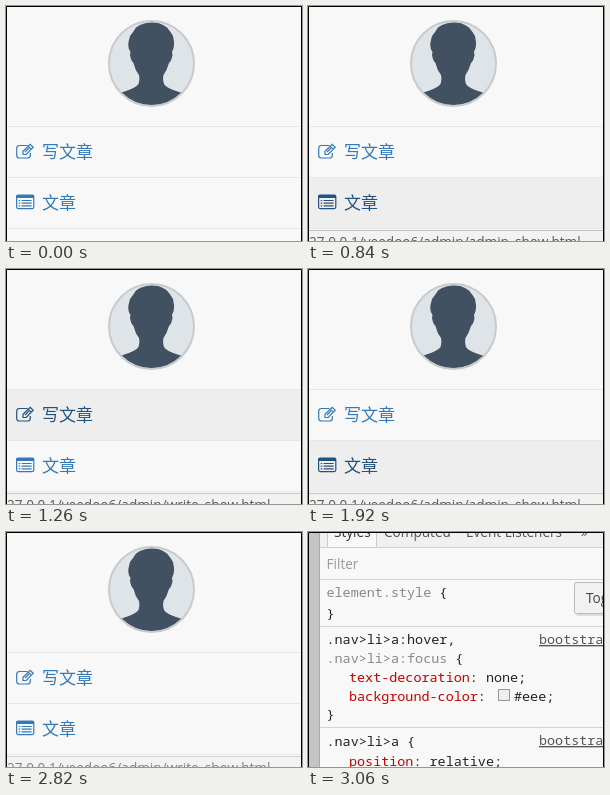
These frames come from a looping animation (296 by 235 pixels, 3.9 s). An HTML page:

```html
<!DOCTYPE html>
<html lang="zh">
<head>
<meta charset="utf-8">
<style>
html, body { margin: 0; width: 100%; height: 100%; overflow: hidden; background: #f8f8f8; }
svg { display: block; width: 100vw; height: 100vh; }
text { white-space: pre; }
.row rect.bg { fill: none; }
.row { color: #337ab7; }
.row.on { color: #23527c; }
.row.on rect.bg { fill: #eee; }
.row text { font: 300 17px "Noto Sans CJK SC", "Noto Sans CJK", sans-serif; fill: currentColor; }
.ui { font: 13.6px "Open Sans", sans-serif; }
.code { font: 13.43px "Noto Sans Mono", monospace; fill: #222; }
.dim { fill: #888; }
.prop { fill: #c80000; }
.link { fill: #555; text-decoration: underline; }
</style>
</head>
<body>
<svg viewBox="0 0 296 235">
  <defs><clipPath id="round"><circle cx="145.5" cy="57.5" r="42"/></clipPath></defs>
  <g id="menu">
    <rect width="296" height="235" fill="#f8f8f8"/>
    <circle cx="145.5" cy="57.5" r="42" fill="#dfe4e8"/>
    <path clip-path="url(#round)" fill="#425161" d="M100 102V92Q107 89 117 86Q130 82 132.500 78Q134 74 133 69
      Q129 64 127.500 57Q125 55 124 49L124.500 46Q121.500 42 122.500 36L124 30L127 26L130 21.500L134 19
      Q140 16 146 16.500Q153 16 157 19L161 21.500L164.500 26L167 30L168 36Q168.500 42 166 46L166.500 49
      Q165.500 55 163 57Q161 64 157.500 69Q156.500 74 158 78Q160 82 173 86Q184 89 191 92V102Z"/>
    <circle cx="145.5" cy="57.5" r="42.500" fill="none" stroke="#c7cbcd" stroke-width="2"/>
    <g class="row">
      <rect class="bg" x="1" y="121" width="294" height="50"/>
      <g fill="none" stroke="currentColor">
        <path stroke-width="1.200" d="M21.500 139.500H13.500Q10.700 139.500 10.700 142.300V149.200Q10.700 152 13.500 152H21.500Q24.300 152 24.300 149.200V147"/>
        <path stroke-width="1.200" d="M17 148.500V145.200L24.200 138.300L27.200 141.200L20.200 148.500ZM22.300 140.200L25.200 143.200M19 146L23 142"/>
      </g>
      <text x="36" y="152">写文章</text>
    </g>
    <g class="row">
      <rect class="bg" x="1" y="172" width="294" height="50"/>
      <g fill="none" stroke="currentColor">
        <rect x="10.600" y="189" width="17.200" height="13.600" rx="1.500" stroke-width="1.200"/>
        <path stroke-width="3" d="M10.500 190.500H28"/>
        <path stroke-width="1.200" d="M12.700 194.500h1.500m1.400 0h10M12.700 197.200h1.500m1.400 0h10M12.700 199.900h1.500m1.400 0h10"/>
      </g>
      <text x="36" y="203">文章</text>
    </g>
    <path stroke="#e7e7e7" d="M1 120.500H295M1 171.500H295M1 222.500H295"/>
    <g id="status">
      <rect x="1" y="224" width="294" height="11" fill="#f2f2f2"/>
      <path stroke="#c4c4c4" d="M1 224.500H295"/>
      <text id="url" class="ui" x="1" y="241" fill="#5a5a5a"></text>
    </g>
  </g>
  <g id="panel">
    <rect width="296" height="235" fill="#f8f8f8"/>
    <path fill="#c4c4c4" d="M1 1H11V235H1Z"/>
    <path fill="#f0f0f0" d="M12 1H295V15H12Z"/>
    <path fill="#f8f8f8" stroke="#ccc" d="M19.500 0V15.500H68.500V0"/>
    <path stroke="#aaa" d="M11.500 1V235"/>
    <path stroke="#d4d4d4" d="M12 15.500H19M69 15.500H295M12 47.500H295M12 94.500H295M12 195.500H295"/>
    <g class="ui" fill="#555">
      <text x="26" y="5" fill="#333">Styles</text>
      <text x="76" y="5">Computed</text>
      <text x="158" y="5">Event Listeners</text>
      <text x="273" y="5">»</text>
      <text x="18.500" y="37" fill="#999">Filter</text>
    </g>
    <g class="code">
      <text x="18.500" y="65">
        <tspan class="dim" x="18.500">element.style</tspan> {</text>
      <text x="18.500" y="86">}</text>
      <text x="18.500" y="112">.nav&gt;li&gt;a:hover,</text>
      <text x="18.500" y="131"><tspan class="dim">.nav&gt;li&gt;a:focus</tspan> {</text>
      <text x="41" y="150"><tspan class="prop">text-decoration</tspan>: none;</text>
      <text x="41" y="168.500"><tspan class="prop">background-color</tspan>:</text>
      <rect x="190.500" y="157.500" width="11" height="11" fill="#eee" stroke="#999"/>
      <text x="206" y="168.500">#eee;</text>
      <text x="18.500" y="187">}</text>
      <text x="18.500" y="213.500">.nav&gt;li&gt;a {</text>
      <text x="41" y="234"><tspan class="prop">position</tspan>: relative;</text>
      <text class="link" x="231" y="112">bootstrap</text>
      <text class="link" x="231" y="213">bootstrap</text>
    </g>
    <rect x="268" y="52" width="40" height="32" rx="2" fill="#ddd"/>
    <rect x="266.500" y="50.500" width="40" height="31" rx="2" fill="#f1f1f1" stroke="#bbb"/>
    <text class="ui" x="278" y="71" fill="#444">Toggle</text>
  </g>
  <path fill="none" stroke="#000" d="M.5 235V.5H295.500V235"/>
</svg>
<script>
const LOOP = 3900, PANEL_AT = 3060;
// [start ms, hovered row (0 = none), status bar opacity, row whose address shows]
const steps = [
  [0, 0, 0, 1], [240, 2, 0, 2], [420, 2, .5, 2], [480, 1, 1, 1],
  [780, 0, 1, 1], [840, 2, 1, 2], [960, 0, 1, 2], [1020, 1, 1, 1],
  [1140, 0, 1, 1], [1200, 2, 1, 2], [1260, 1, 1, 1],
  [1920, 2, 1, 2], [2040, 1, 1, 1], [2220, 2, 1, 2], [2280, 1, 1, 1],
  [2520, 0, 1, 1], [2820, 0, .75, 1], [2880, 0, .5, 1], [2940, 0, .25, 1], [3000, 0, 0, 1]
];
const pages = ["write_show.html", "admin_show.html"];
const rows = document.querySelectorAll(".row");
const el = id => document.getElementById(id);

function draw(now) {
  const t = now % LOOP;
  const [, hover, opacity, page] = steps.findLast(s => s[0] <= t);
  rows.forEach((row, i) => row.classList.toggle("on", hover === i + 1));
  el("status").style.opacity = opacity;
  el("url").textContent = "27.0.0.1/yeedoo6/admin/" + pages[page - 1];
  el("panel").style.display = t < PANEL_AT ? "none" : "";
}

const start = performance.now();
function tick() {
  draw(performance.now() - start);
  requestAnimationFrame(tick);
}
tick();
</script>
</body>
</html>
```
